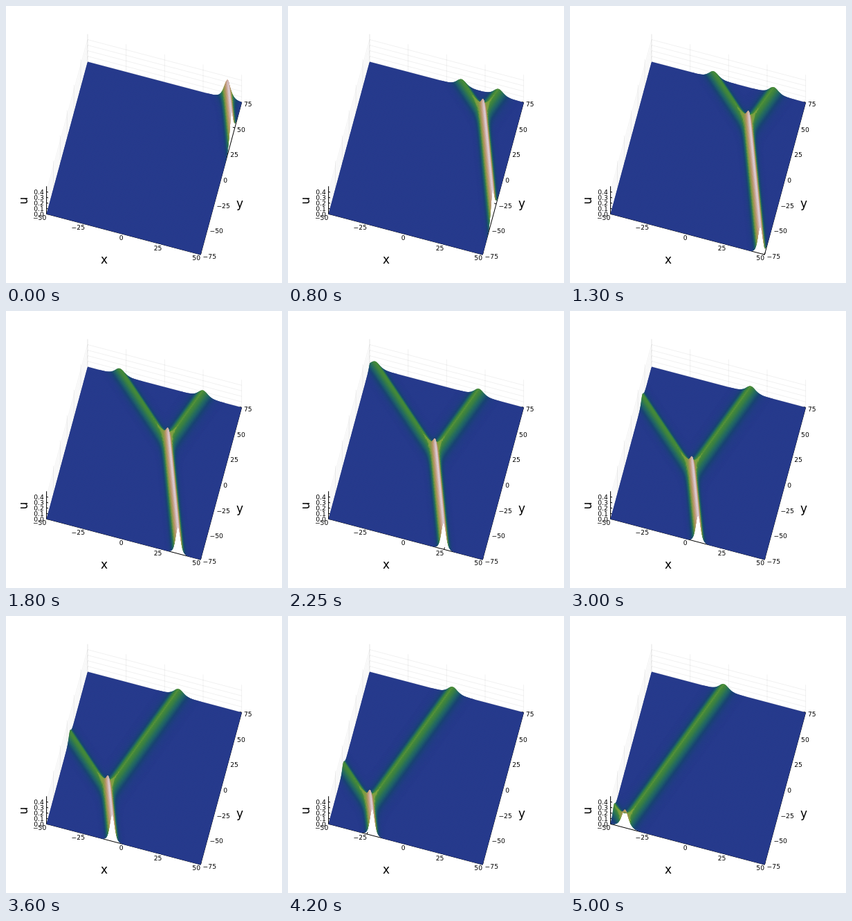
Animation of 399 by 400 pixels, one loop 5.05 s. Source, as an HTML page with a canvas:

```html
<!DOCTYPE html>
<html lang="en">
<head>
<meta charset="utf-8">
<title>Resonant soliton surface</title>
<style>
  html, body { margin: 0; width: 100%; height: 100%; overflow: hidden; background: #fff; }
  canvas { display: block; }
</style>
</head>
<body>
<canvas id="plot" width="399" height="400"></canvas>
<script>
const ctx = document.getElementById('plot').getContext('2d');
const STEP = 50, FRAMES = 101;
const X0 = -50, X1 = 50, Y0 = -75, Y1 = 75, UMAX = 0.5;
const NX = 200, NY = 150;
const FONT = '"DejaVu Sans", sans-serif';
const xTicks = [-50, -25, 0, 25, 50];
const yTicks = [-75, -50, -25, 0, 25, 50, 75];
const uTicks = [0, 0.1, 0.2, 0.3, 0.4];

// Orthographic projection of (x, y, u) to the stage
const px = (x, y) => 58.6 + (x - X0) * 2.227 + (y - Y0) * 0.396;
const py = (x, y, u) => 300.3 + (x - X0) * 0.587 - (y - Y0) * 1.465 - u * 80;

// Colour ramp: share of full height, then r, g, b
const ramp = [
  [0, 38, 58, 140], [0.02, 33, 62, 131], [0.05, 25, 67, 116], [0.1, 31, 95, 106],
  [0.15, 40, 112, 92], [0.2, 56, 126, 70], [0.247, 70, 138, 58], [0.25, 122, 162, 62],
  [0.36, 142, 150, 76], [0.5, 175, 150, 95], [0.62, 194, 150, 115],
  [0.75, 204, 165, 146], [0.88, 206, 181, 182], [1, 226, 213, 222]
];
const LEVELS = 500;
const palette = Array.from({ length: LEVELS + 1 }, (_, n) => {
  const s = n / LEVELS;
  const i = Math.max(1, ramp.findIndex(r => r[0] >= s));
  const a = ramp[i - 1], b = ramp[i], f = (s - a[0]) / (b[0] - a[0]);
  const mix = c => Math.round(a[c] + (b[c] - a[c]) * f);
  return `rgb(${mix(1)},${mix(2)},${mix(3)})`;
});

// KP soliton: u = 2 (log tau)_xx, tau = sum of exp(-(kx + k^2 y + k^3 t))
const K = [-0.375, 0.125, 0.625];
function height(x, y, t) {
  const p = K.map(k => -k * (x + k * (y + k * t)));
  const top = Math.max(p[0], p[1], p[2]);
  let sum = 0, m1 = 0, m2 = 0;
  for (let i = 0; i < 3; i++) {
    const e = Math.exp(p[i] - top), k = K[i];
    sum += e; m1 += k * e; m2 += k * k * e;
  }
  m1 /= sum;
  return 2 * (m2 / sum - m1 * m1);
}

function line(a, b) {
  ctx.beginPath();
  ctx.moveTo(px(a[0], a[1]), py(...a));
  ctx.lineTo(px(b[0], b[1]), py(...b));
  ctx.stroke();
}

function drawGrid() {
  ctx.strokeStyle = 'rgba(0,0,0,0.1)';
  ctx.lineWidth = 0.6;
  for (const x of xTicks) {
    line([x, Y0, 0], [x, Y1, 0]);
    line([x, Y1, 0], [x, Y1, UMAX]);
  }
  for (const y of yTicks) {
    line([X0, y, 0], [X1, y, 0]);
    line([X0, y, 0], [X0, y, UMAX]);
  }
  for (const u of uTicks) {
    line([X0, Y1, u], [X1, Y1, u]);
    line([X0, Y0, u], [X0, Y1, u]);
  }
}

function drawAxes() {
  ctx.strokeStyle = '#000';
  ctx.lineWidth = 1;
  line([X0, Y0, 0], [X1, Y0, 0]);
  line([X1, Y0, 0], [X1, Y1, 0]);
  line([X0, Y0, 0], [X0, Y0, UMAX]);
  for (const x of xTicks) line([x, Y0, 0], [x, Y0 + 2, 0]);
  for (const y of yTicks) line([X1, y, 0], [X1 - 1.3, y, 0]);
  for (const u of uTicks) line([X0, Y0, u], [X0 + 1.1, Y0, u]);
}

// Cells from back to front; each overlaps the next one so no seams show
function drawSurface(t) {
  const xs = i => X0 + (X1 - X0) * i / NX;
  const ys = j => Y1 - (Y1 - Y0) * j / NY;
  const W = NX + 1, u = new Float32Array(W * (NY + 1));
  for (let j = 0; j <= NY; j++)
    for (let i = 0; i <= NX; i++) u[j * W + i] = height(xs(i), ys(j), t);
  const shade = (i, j) => {
    const n = j * W + i;
    const mean = (u[n] + u[n + 1] + u[n + W] + u[n + W + 1]) / 4;
    return Math.min(LEVELS, Math.round(mean / UMAX * LEVELS));
  };
  const corner = (i, j, first) => {
    const x = xs(i), y = ys(j);
    ctx[first ? 'moveTo' : 'lineTo'](px(x, y), py(x, y, u[j * W + i]));
  };
  for (let j = 0; j < NY; j++) {
    const front = Math.min(j + 2, NY);
    for (let i = 0; i < NX;) {
      const c = shade(i, j);
      let end = i + 1;
      if (c === 0) while (end < NX && shade(end, j) === 0) end++;
      const right = Math.min(end + 1, NX);
      ctx.fillStyle = palette[c];
      ctx.beginPath();
      corner(i, j, true);
      corner(right, j);
      corner(right, front);
      corner(i, front);
      ctx.fill();
      i = end;
    }
  }
}

function drawLabels() {
  const num = v => String(v).replace('-', '\u2212');
  ctx.fillStyle = '#000';
  ctx.textBaseline = 'alphabetic';
  ctx.font = '9.2px ' + FONT;
  ctx.textAlign = 'right';
  for (const x of xTicks) ctx.fillText(num(x), px(x, Y0) - 0.3, py(x, Y0, 0) + 8.4);
  for (const u of uTicks) ctx.fillText(u.toFixed(1), 54.8, py(X0, Y0, u) + 3.3);
  ctx.textAlign = 'left';
  for (const y of yTicks) ctx.fillText(num(y), px(X1, y) + 3.3, py(X1, y, 0) + 5.8);

  ctx.font = '17px ' + FONT;
  ctx.textAlign = 'center';
  ctx.fillText('x', 142, 371.5);
  ctx.fillText('y', 338, 290.8);
  ctx.save();
  ctx.translate(30.5, 281);
  ctx.rotate(-Math.PI / 2);
  ctx.fillText('u', 0, 0);
  ctx.restore();
}

function draw(frame) {
  ctx.fillStyle = '#fff';
  ctx.fillRect(0, 0, 399, 400);
  drawGrid();
  drawAxes();
  drawSurface(-200 + 4 * frame);
  drawLabels();
}

let shown = -1;
function tick() {
  const frame = Math.floor(performance.now() / STEP) % FRAMES;
  if (frame !== shown) draw(shown = frame);
  requestAnimationFrame(tick);
}
tick();
</script>
</body>
</html>
```
